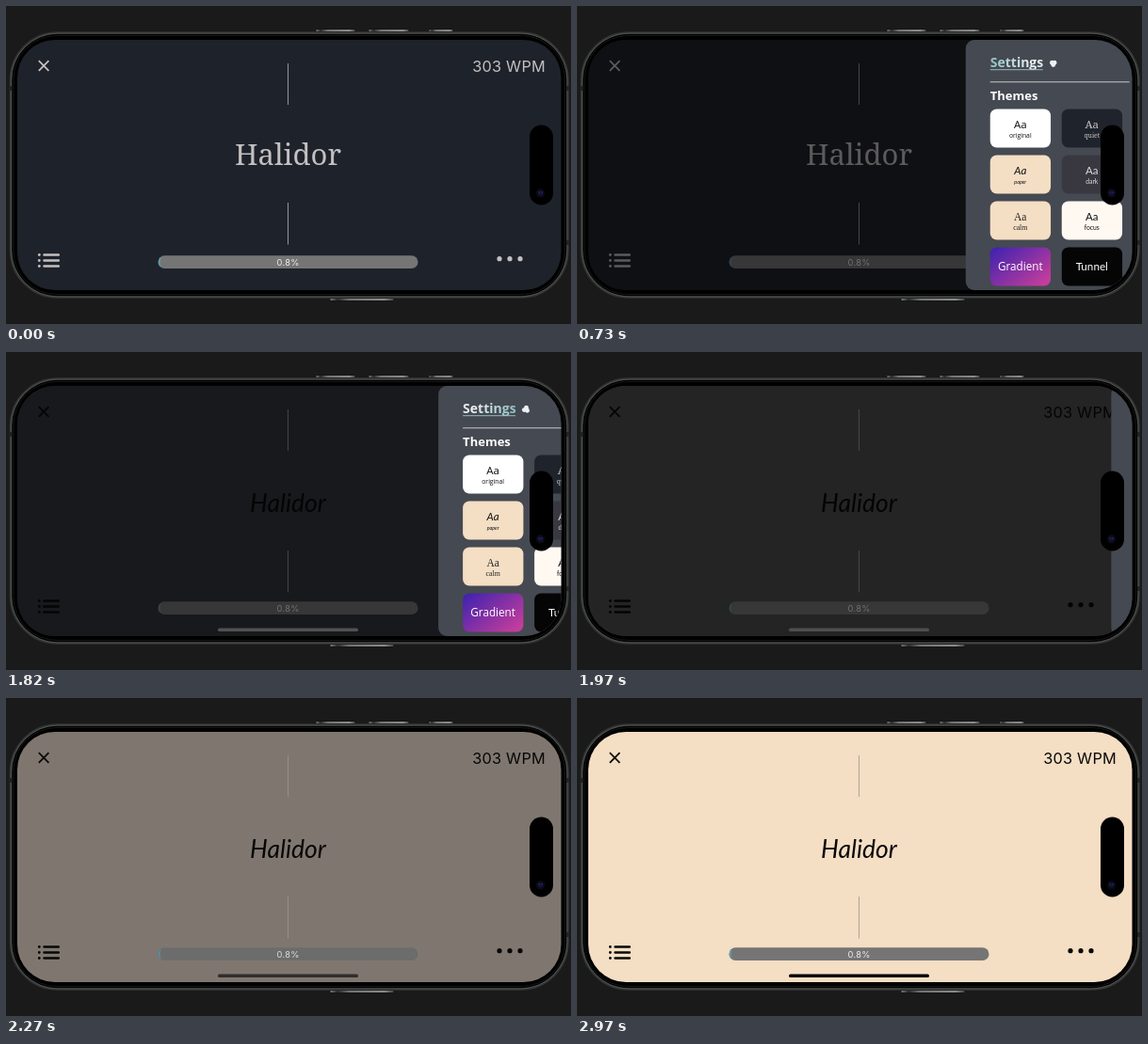
Animation, 600 px wide and 338 px high, one loop 3 s. Source, as an HTML page:

```html
<!DOCTYPE html>
<html lang="en">
<head>
<meta charset="utf-8">
<title>Reader themes</title>
<style>
  html, body { margin: 0; width: 100%; height: 100%; overflow: hidden; background: #1a1a1a; }
  svg { display: block; width: 600px; height: 338px; }
  text { font-family: "Open Sans", sans-serif; }
  .mid { text-anchor: middle; }
  .ui { font-family: Inter, sans-serif; }
</style>
</head>
<body>
<svg viewBox="0 0 600 338">
  <defs>
    <clipPath id="screen"><rect x="12" y="36" width="577.5" height="266" rx="40"/></clipPath>
    <linearGradient id="metal">
      <stop offset="0" stop-color="#aaa"/><stop offset=".12" stop-color="#333"/>
      <stop offset=".3" stop-color="#999"/><stop offset=".85" stop-color="#bbb"/>
      <stop offset="1" stop-color="#555"/>
    </linearGradient>
    <linearGradient id="violet" x2="1" y2=".8">
      <stop offset="0" stop-color="#3a22b0"/><stop offset="1" stop-color="#c43d9c"/>
    </linearGradient>
    <linearGradient id="shine" gradientUnits="userSpaceOnUse" x1="0" x2="90" spreadMethod="repeat">
      <stop offset="0" stop-color="#8fc0c4"/><stop offset=".5" stop-color="#eef2f4"/>
      <stop offset="1" stop-color="#8fc0c4"/>
    </linearGradient>
  </defs>

  <rect width="600" height="338" fill="#1a1a1a"/>
  <g fill="url(#metal)" stroke="#0c0c0c" stroke-width=".6">
    <rect x="329" y="25" width="42" height="2.1" rx="1"/>
    <rect x="385" y="25" width="43" height="2.1" rx="1"/>
    <rect x="449" y="25" width="26" height="2.1" rx="1"/>
    <rect x="344" y="311" width="68" height="2.1" rx="1"/>
  </g>
  <rect x="5" y="28.5" width="591.5" height="281" rx="50" fill="#000" stroke="#343635" stroke-width="2.6"/>
  <rect x="5.5" y="29" width="590.5" height="280" rx="49.5" fill="none" stroke="#525453" stroke-width=".9"/>
  <rect x="8" y="31.5" width="585.5" height="275" rx="46" fill="#000" stroke="#151616"/>
  <path d="M5 85v5M596.5 85v5M596.5 249v5" stroke="#222" stroke-width="2.6"/>

  <g clip-path="url(#screen)">
    <rect id="page" x="12" y="36" width="578" height="266"/>
    <path id="guides" stroke-width="1"/>
    <g id="ink">
      <path d="M34.8 58.2l10.6 10.6M45.4 58.2l-10.6 10.6" stroke="currentColor" stroke-width="1.8"/>
      <path d="M40.5 264.5h15.3M40.5 270.5h15.3M40.5 276.5h15.3" stroke="currentColor" stroke-width="2.5" stroke-linecap="round"/>
      <g fill="currentColor">
        <circle cx="35.3" cy="264.5" r="1.4"/><circle cx="35.3" cy="270.5" r="1.4"/><circle cx="35.3" cy="276.5" r="1.4"/>
        <circle cx="524" cy="268.7" r="2.6"/><circle cx="535" cy="268.7" r="2.6"/><circle cx="546" cy="268.7" r="2.6"/>
        <text class="ui" x="573" y="69.6" font-size="16.3" text-anchor="end" letter-spacing=".25">303 WPM</text>
        <text id="word" class="mid" x="299.5">Halidor</text>
      </g>
    </g>
    <rect x="161.5" y="265.3" width="276" height="13.8" rx="6.9" fill="#757575"/>
    <path d="M164 267.6q-3.8 4.6 0 9.2q-1.6-4.6 0-9.2z" fill="#5aa0b8" stroke="#5aa0b8" stroke-width=".6"/>
    <text class="ui mid" x="299.7" y="275.7" font-size="9.3" letter-spacing=".3" fill="#eee">0.8%</text>
    <rect id="dim" x="12" y="36" width="578" height="266"/>
    <rect id="home" x="225" y="293.6" width="149" height="3.5" rx="1.7"/>

    <g id="panel">
      <rect y="36" width="240" height="266" rx="9" fill="#454951"/>
      <text x="26" y="65" font-size="14" font-weight="700" fill="url(#shine)">Settings</text>
      <path d="M26 67.7h56" stroke="#9fc4c8" stroke-width=".9"/>
      <g id="dots" fill="#eef0f4"><circle r="2.4"/><circle r="2.4"/><circle r="2.4"/></g>
      <path d="M26 80.7h148" stroke="#c4c6ca" stroke-width="1.1"/>
      <text x="26" y="100.3" font-size="13" font-weight="700" fill="#fff">Themes</text>
      <g id="cards"></g>
    </g>
  </g>

  <rect x="556" y="126.5" width="25" height="85" rx="12.5" fill="#000"/>
  <circle cx="567.5" cy="198.8" r="4.8" fill="#0a0a16"/>
  <circle cx="567.5" cy="198.8" r="2.6" fill="#121233"/>
  <circle cx="566" cy="198" r=".7" fill="#34347c"/><circle cx="569.2" cy="198" r=".7" fill="#34347c"/>
</svg>

<script>
const LOOP = 3000, OPEN = 375, SHUT = 590;
const $ = id => document.getElementById(id);
const set = (el, attrs) => { for (const k in attrs) el.setAttribute(k, attrs[k]); };
const clamp = v => Math.max(0, Math.min(1, v));
const mix = (a, b, p) => a + (b - a) * p;
const easeOut = p => 1 - (1 - clamp(p)) ** 3;

// Linear interpolation through [time, value] points
function track(t, points) {
  let [t0, v0] = points[0];
  if (t <= t0) return v0;
  for (const [t1, v1] of points) {
    if (t < t1) return mix(v0, v1, (t - t0) / (t1 - t0));
    [t0, v0] = [t1, v1];
  }
  return v0;
}

const SANS = '"Open Sans", sans-serif', SERIF = '"Noto Serif", serif';
const ROUND = 'Lato, sans-serif', TIMES = '"Liberation Serif", serif';
const themes = [
  ['original', '#fff', '#111', SANS], ['quiet', '#1f232c', '#c8c4c4', SERIF],
  ['paper', '#f4dec4', '#111', ROUND, 'italic'], ['dark', '#393841', '#ddd', ROUND],
  ['calm', '#f4dec4', '#222', TIMES], ['focus', '#fff9f1', '#111', ROUND],
  ['Gradient', 'url(#violet)', '#fff', SANS], ['Tunnel', '#050505', '#fff', ROUND]
];
$('cards').innerHTML = themes.map(([name, fill, color, font, style = 'normal'], i) => {
  const x = 26 + i % 2 * 76, y = 109.5 + (i >> 1) * 49;
  const label = (str, dy, size) =>
    `<text class="mid" x="${x + 32}" y="${y + dy}" font-size="${size}" fill="${color}"
      style='font-family:${font};font-style:${style}'>${str}</text>`;
  const small = style === 'italic' ? 5.4 : font === TIMES ? 7.8 : 6.8;
  return `<rect x="${x}" y="${y}" width="64.3" height="41" rx="7" fill="${fill}"/>` +
    (i < 6 ? label('Aa', 20, 11.5) + label(name, 30.5, small) : label(name, 24.5, 11.7));
}).join('');

const quiet = [30, 34, 43], paper = [244, 222, 196];

function draw(t) {
  const isPaper = t >= 1700;
  const tint = track(t, [[1700, 0], [1970, .23], [2180, .42], [2580, .78], [2900, 1]]);
  set($('page'), { fill: `rgb(${quiet.map((c, i) => mix(c, paper[i], tint))})` });

  $('ink').style.color = isPaper ? '#080808' : '#c4c0c1';
  const low = isPaper ? 211 : 209;
  set($('guides'), {
    d: `M299.5 61v44M299.5 ${low}v44.5`,
    stroke: isPaper ? `rgb(${[150, 143, 132].map(c => c + 22 * tint)})` : '#969698'
  });
  set($('word'), { y: isPaper ? 169.5 : 168.7, 'font-size': isPaper ? 26.5 : 31 });
  $('word').style.cssText = isPaper
    ? `font-family:${ROUND};font-style:italic` : `font-family:${SERIF};font-weight:300`;

  set($('dim'), { opacity: .53 * (easeOut((t - 555) / 200) - clamp((t - 1970) / 350)) });

  const grey = track(t, [[1360, 92], [1970, 78], [2180, 58], [2560, 6]]);
  set($('home'), { fill: `rgb(${grey},${grey},${grey})`, opacity: clamp((t - 1000) / 250) });

  const shown = easeOut((t - 555) / 400) - easeOut((t - 1760) / 400);
  set($('panel'), { transform: `translate(${mix(SHUT, OPEN, shown)})` });

  const turn = (t - 1360) / 1260 * 2 * Math.PI;
  const spread = 2.7 + 1.2 * Math.cos(turn);
  [...$('dots').children].forEach((dot, i) => {
    const a = turn - Math.PI / 2 + i * 2 * Math.PI / 3;
    set(dot, { cx: 93 + spread * Math.cos(a), cy: 61 + spread * Math.sin(a) });
  });
  set($('shine'), { gradientTransform: `translate(${(t - 730) * .05 + 26})` });
}

const start = performance.now();
function frame() {
  draw((performance.now() - start) % LOOP);
  requestAnimationFrame(frame);
}
frame();
</script>
</body>
</html>
```
